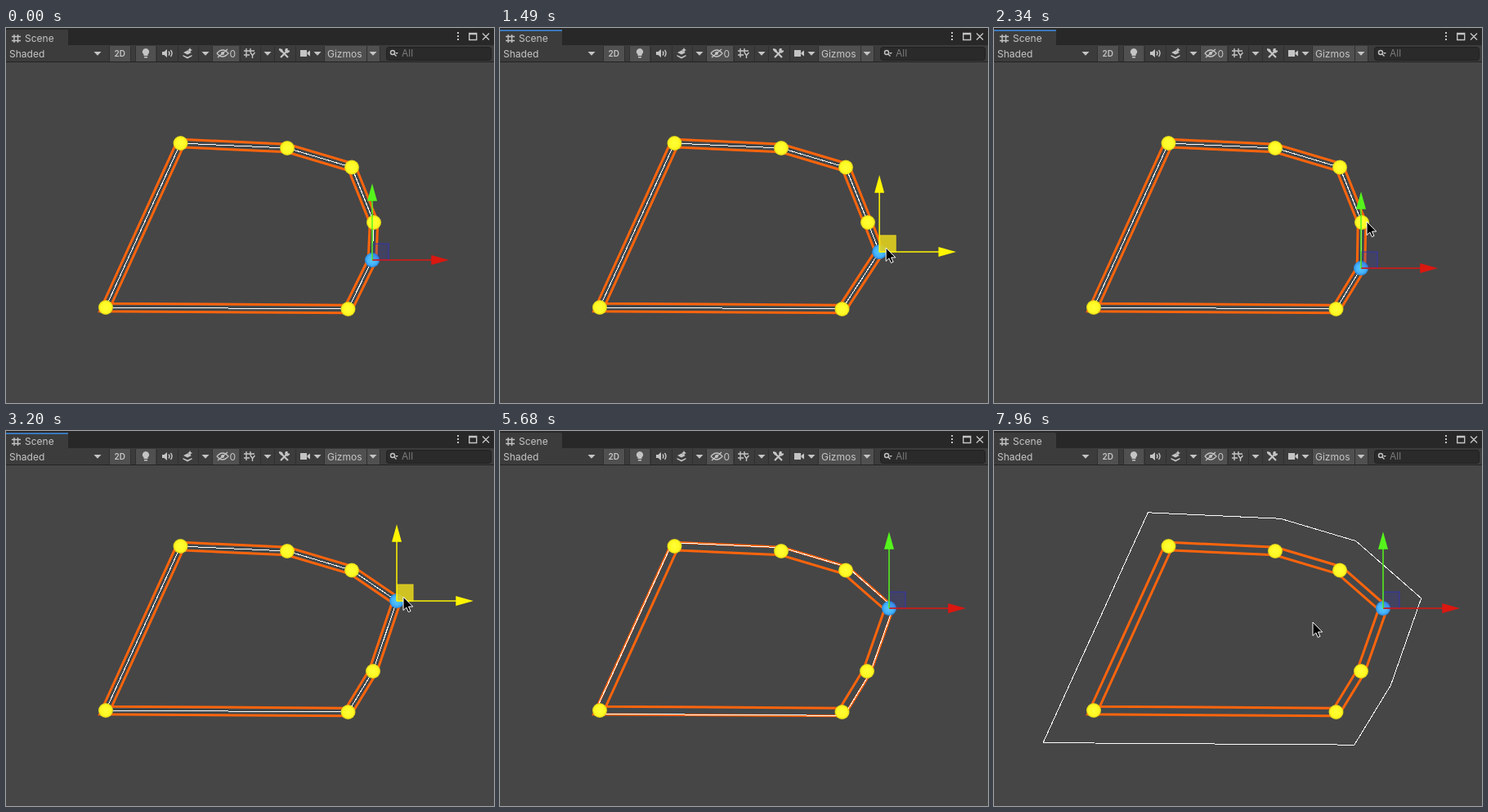
Write an HTML page that moves like this. It is 597x459 px and loops after 8000 ms.

```html
<!DOCTYPE html>
<html lang="en">
<head>
<meta charset="utf-8">
<title>Scene view</title>
<style>
html, body { margin: 0; width: 100%; height: 100%; overflow: hidden; background: #464646; }
svg { display: block; width: 100%; height: 100%; }
text { font: 12px Inter, sans-serif; fill: #c6c6c6; }
.icon { fill: #c4c4c4; }
.line { fill: none; stroke: #c4c4c4; stroke-width: 1.4; }
.on { fill: #505050; }
.mesh { fill: #42484b; fill-rule: evenodd; stroke: #ff640c; stroke-width: 3; }
.collider { fill: none; stroke: #fff; shape-rendering: crispEdges; }
.axis { stroke-width: 1.5; }
</style>
</head>
<body>
<svg viewBox="0 0 597 459">
  <defs>
    <radialGradient id="yellow">
      <stop offset="0" stop-color="#ffff38"/><stop offset=".75" stop-color="#fff820"/><stop offset="1" stop-color="#d8cc18"/>
    </radialGradient>
    <radialGradient id="blue">
      <stop offset="0" stop-color="#58ccff"/><stop offset=".7" stop-color="#42b0fc"/><stop offset="1" stop-color="#2886d8"/>
    </radialGradient>
    <path id="drop" d="M-4.5-2h9L0 2.8z"/>
  </defs>
  <rect width="597" height="459" fill="#464646"/>

  <path class="mesh" id="mesh"/>
  <polygon class="collider" id="collider"/>
  <g id="handles"></g>
  <g id="gizmo">
    <rect id="plane" x=".5" y="-20" width="19.5" height="20"/>
    <path class="axis" id="axisX" d="M0 0H73M73-5L91 0 73 5z"/>
    <path class="axis" id="axisY" d="M0 0V-73M-5-73L0-91 5-73z"/>
  </g>

  <rect width="597" height="21" fill="#282828"/>
  <path d="M0 2H74q2 0 2 2V21H597V41H0z" fill="#3c3c3c"/>
  <rect id="focus" y="2" width="76" height="2" fill="#3a79bb"/>
  <rect y="41" width="597" height="1" fill="#232323"/>
  <path class="on" d="M127 22h25v19h-25zM159 22h24v19h-24zM253 22h32v19h-32zM390 22h67v19h-67z"/>
  <path d="M126.5 22v19M152.5 22v19M158.5 22v19M184.5 22v19M210.5 22v19M235.5 22v19M252.5 22v19M286.5 22v19M311.5 22v19M328.5 22v19M354.5 22v19M389.5 22v19M441.5 22v19M457.5 22v19" stroke="#303030"/>

  <path class="line" d="M10 8v10M14.5 8v10M7 10.5h11M7 15.5h11"/>
  <text x="23" y="17">Scene</text>
  <path class="icon" d="M552 5h2v2h-2zM552 9h2v2h-2zM552 13h2v2h-2z"/>
  <path class="line" d="M566.7 6.5h9v8h-9zM566 7.5h10M583 6.5l8 8M591 6.5l-8 8"/>

  <text x="4" y="36">Shaded</text>
  <text x="132.500" y="35" style="font-size:10px;font-weight:600">2D</text>
  <path class="icon" d="M171 25a4 4 0 0 1 2.500 7.200V34h-5v-1.800A4 4 0 0 1 171 25zM169 35h4v1.500h-4z"/>
  <path class="icon" d="M191 29h2.500l3.500-3v10l-3.500-3H191z"/>
  <path class="line" d="M199 28.500q2 2.500 0 5M201.500 27q3 4 0 8"/>
  <path class="icon" d="M217 30l5-2.500 5 2.500-5 2.500zM216.500 33l5.500 2.500 5.500-2.500v1.500L222 37.500l-5.500-3zM225 24l1 2 2 1-2 1-1 2-1-2-2-1 2-1z"/>
  <path class="line" d="M258 31q7-8 14 0q-7 8-14 0M259 36l12-10"/>
  <circle class="icon" cx="265" cy="31" r="2"/>
  <text x="273.500" y="36">0</text>
  <path class="line" d="M294 25v11M299 25v5M291 28h13M291 33h7M299 30l2.500 3.500 3-3.500M301.500 33v4"/>
  <path class="line" d="M336 36l9-9M335 26l10 10" style="stroke-width:2.200"/>
  <path class="icon" d="M342 25h3l-1 2 2 1 1-1v2l-3 2-3-3zM334 25l4 1 1 3-2 1-3-3z"/>
  <path class="icon" d="M360 27h8v8h-8zM368.500 30l3.500-2.500v7l-3.500-2.500z"/>
  <text x="393" y="36">Gizmos</text>
  <g class="icon">
    <use href="#drop" x="112" y="31"/><use href="#drop" x="244" y="31"/><use href="#drop" x="320" y="31"/>
    <use href="#drop" x="381" y="31"/><use href="#drop" x="449" y="31"/>
  </g>
  <rect x="465.500" y="23.500" width="128" height="16" rx="3" fill="#2a2a2a" stroke="#212121"/>
  <circle class="line" cx="473" cy="30" r="2.500"/>
  <path class="line" d="M475 32l2.500 2.500"/>
  <path class="icon" d="M476 30h4l-2 2z"/>
  <text x="484" y="35" style="fill:#7c7c7c">All</text>

  <path id="cursor" d="M0 0V16.500L3.800 13 6.300 18.600 9 17.400 6.500 12H11.700z" fill="#000" stroke="#fff"/>
</svg>
<script>
const LOOP = 8000;
const $ = id => document.getElementById(id);
const GRAB = [8, -5];

const basePoints = [[122, 342], [213.5, 141], [344, 147], [423, 170.5], [450, 238], [448, 284], [418.5, 344]];

// [time, x, y]
const cursorKeys = [
  [280, 271, 428], [600, 390, 335], [890, 456, 279],
  [1130, 456, 279], [1490, 472, 269], [1640, 494, 256], [1880, 457, 289],
  [2010, 457, 289], [2300, 456, 237], [2400, 456, 237], [2530, 458, 233],
  [2720, 458, 233], [3200, 486, 203], [3300, 489, 200], [3460, 484, 212]
];
// [time, collider offset]
const offsetSteps = [
  [0, 0], [5680, 4.3], [5740, 7.5], [5800, 11],
  [6090, 14], [6170, 17], [6250, 19.5], [6330, 22],
  [6480, 24.5], [6560, 27], [6650, 29.3], [6740, 33], [6930, 36.5], [7080, 40]
];

const within = (t, from, to) => t >= from && t < to;
const clamp = (v, lo, hi) => Math.min(hi, Math.max(lo, v));

function track(keys, t) {
  t = clamp(t, keys[0][0], keys.at(-1)[0]);
  const i = Math.max(1, keys.findIndex(k => k[0] >= t));
  const a = keys[i - 1], b = keys[i], u = (t - a[0]) / (b[0] - a[0]);
  return [a[1] + (b[1] - a[1]) * u, a[2] + (b[2] - a[2]) * u];
}

function dragged(t, from, to) {
  const [x, y] = track(cursorKeys, clamp(t, from, to));
  return [x - GRAB[0], y - GRAB[1]];
}

// Grow a clockwise polygon by d with mitred corners.
function offsetPolygon(points, d) {
  const n = points.length;
  const normals = points.map(([x, y], i) => {
    const [x2, y2] = points[(i + 1) % n], len = Math.hypot(x2 - x, y2 - y);
    return [(y2 - y) / len, (x - x2) / len];
  });
  return points.map(([x, y], i) => {
    const a = normals[(i + n - 1) % n], b = normals[i];
    const k = d / (1 + a[0] * b[0] + a[1] * b[1]);
    return [x + (a[0] + b[0]) * k, y + (a[1] + b[1]) * k];
  });
}

const handles = basePoints.map(() => {
  const c = document.createElementNS('http://www.w3.org/2000/svg', 'circle');
  c.setAttribute('r', 9);
  return $('handles').appendChild(c);
});

function paint(id, color) {
  $(id).setAttribute('fill', color);
  $(id).setAttribute('stroke', color);
}

const place = (id, [x, y]) => $(id).setAttribute('transform', `translate(${x} ${y})`);
const show = (id, visible) => $(id).setAttribute('visibility', visible ? 'visible' : 'hidden');

function cursorAt(t) {
  if (within(t, 280, 3740)) return track(cursorKeys, t);
  if (within(t, 7920, 7960)) return [501, 290];
  return t >= 7960 ? [390, 234] : null;
}

function draw(t) {
  const points = basePoints.slice();
  points[5] = dragged(t, 1130, 1880);
  points[4] = dragged(t, 2720, 3460);
  const selected = t < 2480 ? 5 : 4;
  const dragging = within(t, 1130, 1850) || within(t, 2720, 3650);

  const ring = d => `M${offsetPolygon(points, d).join('L')}Z`;
  $('mesh').setAttribute('d', ring(4.8) + ring(-4.8));
  const offset = offsetSteps.findLast(s => s[0] <= t)[1];
  $('collider').setAttribute('points', offsetPolygon(points, offset).join(' '));

  handles.forEach((c, i) => {
    c.setAttribute('cx', points[i][0]);
    c.setAttribute('cy', points[i][1]);
    c.setAttribute('fill', `url(#${i === selected ? 'blue' : 'yellow'})`);
  });

  place('gizmo', points[selected]);
  paint('axisX', dragging ? '#fff500' : '#dc1710');
  paint('axisY', dragging ? '#fff500' : '#55f51c');
  paint('plane', dragging ? '#e0d020' : '#3434b0');
  $('plane').setAttribute('fill-opacity', dragging ? 0.9 : 0.25);
  show('focus', within(t, 1130, 4600));

  const cursor = cursorAt(t);
  show('cursor', cursor);
  if (cursor) place('cursor', cursor);
}

const start = performance.now();
function tick() {
  draw((performance.now() - start) % LOOP);
  requestAnimationFrame(tick);
}
tick();
</script>
</body>
</html>
```
